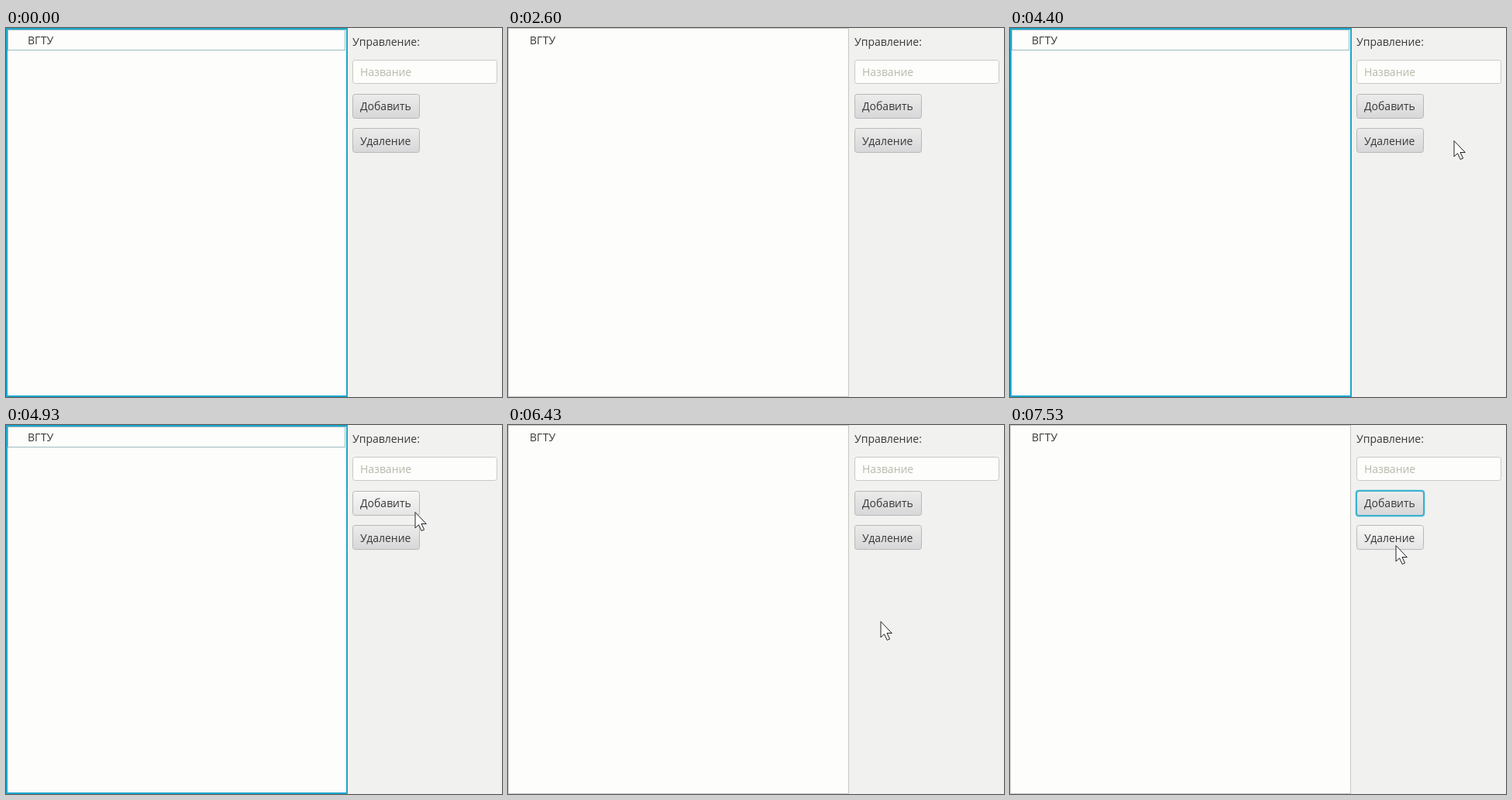
Write an HTML page that moves like this. It is 640 px wide and 476 px high and loops after 8 s.

```html
<!DOCTYPE html>
<html lang="ru">
<head>
<meta charset="utf-8">
<style>
  html, body { margin: 0; width: 100%; height: 100%; overflow: hidden; background: #f1f2f0; }
  svg { display: block; }
  text { font: 14px "Open Sans", sans-serif; fill: #383838; }
  .off { display: none; }
</style>
</head>
<body>
<svg width="640" height="476" viewBox="0 0 640 476">
  <defs>
    <linearGradient id="normal" x2="0" y2="1">
      <stop offset="0" stop-color="#ececeb"/>
      <stop offset="1" stop-color="#d7d7d9"/>
    </linearGradient>
    <linearGradient id="hover" x2="0" y2="1">
      <stop offset="0" stop-color="#f7f7f6"/>
      <stop offset="1" stop-color="#e5e5e5"/>
    </linearGradient>
  </defs>

  <rect x=".5" y=".5" width="439" height="475" fill="#fdfdfb" stroke="#c6c8c2"/>
  <g id="listFocus" fill="none">
    <rect x="1" y="1" width="439" height="474" stroke="#1ca6cc" stroke-width="2"/>
    <rect x="2.5" y="2.5" width="435" height="26" stroke="#9cbcc0"/>
  </g>
  <text x="28" y="21">ВГТУ</text>

  <text x="447" y="23">Управление:</text>
  <rect x="447.5" y="41.5" width="186" height="30" rx="3" fill="#fdfdfb" stroke="#c8cac2"/>
  <text x="457" y="62" style="fill:#b9b9ac">Название</text>

  <rect id="add" x="447.5" y="85.5" width="86" height="31" rx="3" stroke="#b8b8b8"/>
  <g id="addFocus" fill="none">
    <rect x="445.5" y="83.5" width="90" height="35" rx="4" stroke="#a9dcea" stroke-opacity=".7"/>
    <rect x="447" y="85" width="87" height="32" rx="3" stroke="#3db1d0" stroke-width="2"/>
  </g>
  <text x="457" y="106">Добавить</text>

  <rect id="remove" x="447.5" y="129.5" width="86" height="31" rx="3" stroke="#b8b8b8"/>
  <text x="457" y="151">Удаление</text>

  <path id="cursor" d="M1 .5V21L5.5 16.7L9.2 24.5L12.6 23L9 15.5H15.3Z" fill="#fdfdfd" stroke="#222"/>
</svg>
<script>
// All times are in ticks of 1/30 s.
const LOOP = 240, APPEAR = 116;
const el = id => document.getElementById(id);

const start = { x: 601, y: 208 };
const moves = [
  { from: 128, to: 132, x: 572, y: 145 },
  { from: 139, to: 148, x: 527, y: 112 },
  { from: 160, to: 171, x: 515, y: 109 },
  { from: 171, to: 181, x: 486, y: 229 },
  { from: 192, to: 193, x: 480, y: 253 },
  { from: 193, to: 194, x: 487, y: 269 },
  { from: 206, to: 211, x: 520, y: 287 },
  { from: 220, to: 221, x: 538, y: 295 },
  { from: 224, to: 226, x: 497, y: 155 }
];

const between = (tick, from, to) => tick >= from && tick < to;
const show = (id, on) => el(id).classList.toggle("off", !on);

function cursorAt(tick) {
  let { x, y } = start;
  for (const move of moves) {
    const p = Math.max(0, Math.min(1, (tick - move.from) / (move.to - move.from)));
    const eased = p * p * (3 - 2 * p);
    x += (move.x - x) * eased;
    y += (move.y - y) * eased;
  }
  return { x: Math.round(x), y: Math.round(y) };
}

function paintButton(id, tip, active) {
  const { x, y, width, height } = el(id).getBBox();
  const hovered = active && between(tip.x, x, x + width) && between(tip.y, y, y + height);
  el(id).setAttribute("fill", `url(#${hovered ? "hover" : "normal"})`);
}

function draw() {
  const tick = Math.floor((performance.now() + 5) * 0.03) % LOOP;
  const tip = cursorAt(tick);
  const listFocus = tick < 76 || between(tick, 130, 162);
  const addFocus = between(tick, 76, 78) || tick === 162 || tick >= 208;
  const visible = tick >= APPEAR;

  show("listFocus", listFocus);
  show("addFocus", addFocus);
  show("cursor", visible);
  el("cursor").setAttribute("transform", `translate(${tip.x} ${tip.y})`);
  for (const id of ["add", "remove"]) paintButton(id, tip, visible && (listFocus || addFocus));
  requestAnimationFrame(draw);
}
draw();
</script>
</body>
</html>
```
